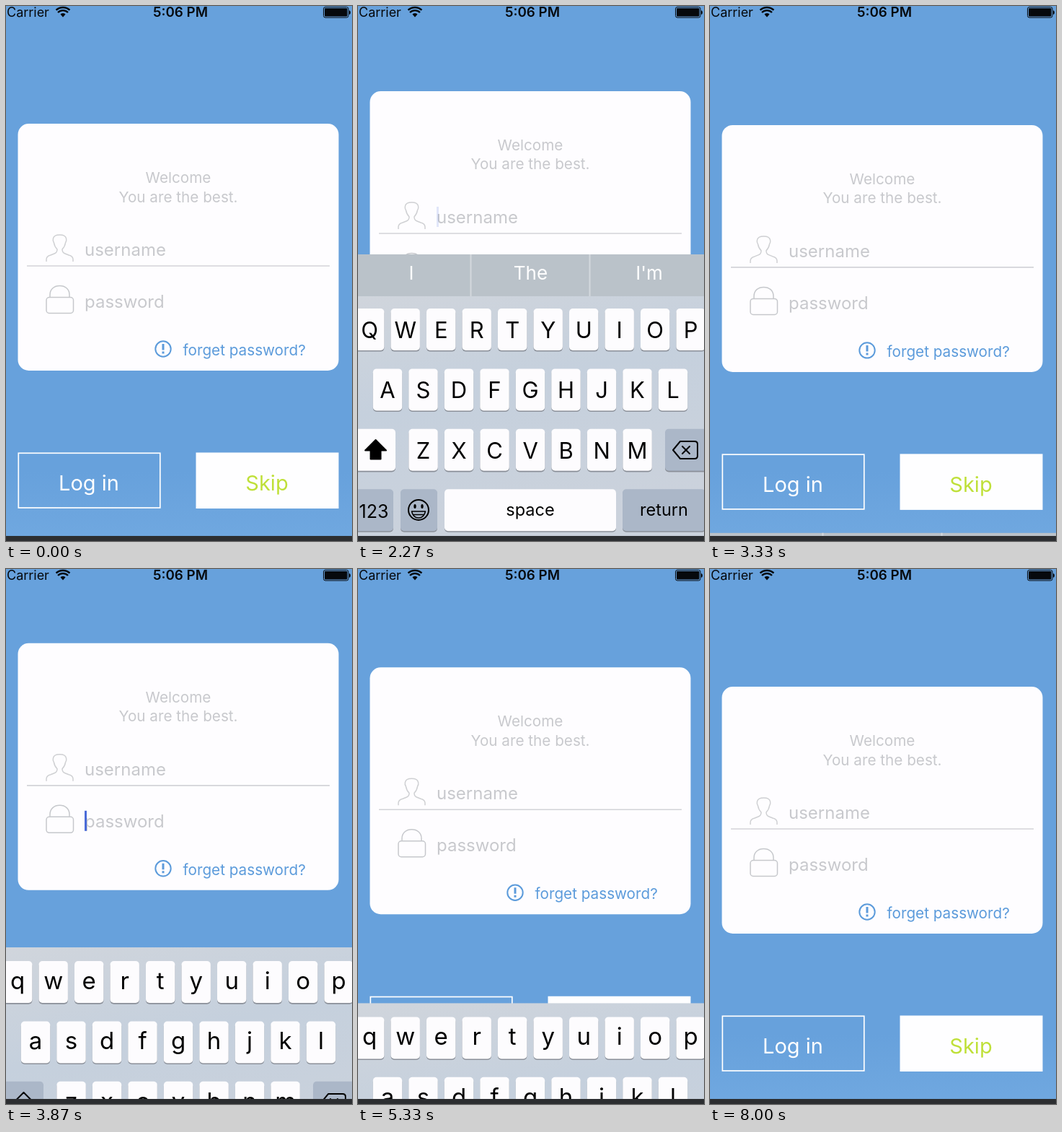
An HTML page for the animation above (8.14 s loop, 480x741 px).

```html
<!DOCTYPE html>
<html lang="en">
<head>
<meta charset="utf-8">
<title>Login screen</title>
<style>
  html, body { margin: 0; width: 100%; height: 100%; overflow: hidden; background: #67a1dc; }
  svg { display: block; width: 100%; height: 100%; font-family: Inter, Roboto, sans-serif; }
  .mid { text-anchor: middle; }
  .hint { fill: #c8c9cd; font-size: 24px; }
  .greeting { fill: #c8c9cd; font-size: 20.7px; text-anchor: middle; }
  .outline { fill: none; stroke: #cfd0d3; stroke-width: 1.5; }
  .lock { stroke: #c6c8cc; }
  .glyph { fill: none; stroke: #000; stroke-width: 2; stroke-linejoin: round; stroke-linecap: round; }
  .caret { fill: #4a6bd8; }
</style>
</head>
<body>
<svg viewBox="0 0 480 741" preserveAspectRatio="none">
  <defs>
    <linearGradient id="sky" x2="0" y2="1">
      <stop offset=".87" stop-color="#67a1dc"/>
      <stop offset="1" stop-color="#70a8e0"/>
    </linearGradient>
    <linearGradient id="board" x2=".3" y2="1">
      <stop offset="0" stop-color="#d0d5dc"/>
      <stop offset=".45" stop-color="#c5d0dd"/>
      <stop offset="1" stop-color="#cbd2dc"/>
    </linearGradient>
  </defs>
  <rect width="480" height="741" fill="url(#sky)"/>

  <g id="form">
    <rect x="16.5" y="163" width="445" height="342" rx="15" fill="#fefdff"/>
    <text class="greeting" x="239" y="245">Welcome</text>
    <text class="greeting" x="239" y="271.500">You are the best.</text>
    <path class="outline" d="M56 354v-3c0-3 2-5 6-6l5-2c3-1 4-3 4-6c-3-3-4-6-4.500-9c-2-3-1.500-4-1-6c.5-3 4-5 9-5s8.500 2 9 5c.5 2 1 3-1 6c-.5 3-1.500 6-4.500 9c0 3 1 5 4 6l5 2c4 1 6 3 6 6v3"/>
    <text class="hint" x="109" y="346">username</text>
    <path d="M29 360H449" stroke="#d3d4d8" stroke-width="1.7"/>
    <path class="outline lock" d="M61 403v-3c0-8 6-12.500 13.500-12.500s13.500 4.500 13.500 12.500v3"/>
    <rect class="outline lock" x="56" y="403.500" width="37.500" height="22" rx="4"/>
    <text class="hint" x="109" y="418">password</text>
    <g fill="none" stroke="#5c9bdb" stroke-width="2">
      <circle cx="218" cy="475" r="10.700"/>
      <path d="M218 468v8.500m0 2v3" stroke-width="3"/>
    </g>
    <text x="245.500" y="484" font-size="20.700" fill="#5c9bdb">forget password?</text>
    <rect x="17.300" y="619.300" width="196.500" height="75.700" fill="none" stroke="#fff" stroke-width="1.700"/>
    <text class="mid" x="115" y="671" font-size="29" fill="#fff">Log in</text>
    <rect x="263.500" y="618.500" width="198" height="77.500" fill="#fefeff"/>
    <text class="mid" x="362" y="671" font-size="29" fill="#bfe039">Skip</text>
    <rect class="caret" id="userCaret" x="109" y="323" width="3" height="28"/>
    <rect class="caret" id="passCaret" x="109" y="395" width="3" height="28"/>
  </g>

  <g fill="#06090d">
    <text x="1" y="15" font-size="18">Carrier</text>
    <text class="mid" x="242" y="15" font-size="18.800" font-weight="600">5:06 PM</text>
    <path d="M75.500 11.500a5 5 0 0 1 7 0l-3.500 4z"/>
    <path d="M72 9a10 10 0 0 1 14 0M69.500 5.700a14 14 0 0 1 19 0" fill="none" stroke="#06090d" stroke-width="2.300"/>
    <rect x="440.500" y="1.500" width="34.500" height="14.500" rx="2.500" fill="none" stroke="#06090d"/>
    <rect x="442" y="3" width="31.500" height="11.500" rx="1"/>
    <path d="M476 6q2 .5 2 3t-2 3z"/>
  </g>

  <g id="userBoard"></g>
  <g id="passBoard"></g>
  <rect y="734" width="480" height="7" fill="#2c2e31"/>
</svg>

<script>
const LOOP = 8140;
const byId = id => document.getElementById(id);

function key(x, y, width, label, size, dark, baseline = 40) {
  const box = (dy, fill) =>
    `<rect x="${x}" y="${y + dy}" width="${width}" height="58" rx="5" fill="${fill}"/>`;
  return box(1.6, '#8b9099') + box(0, dark ? '#abb7c8' : '#fdfcfe') +
    `<text class="mid" x="${x + width / 2}" y="${y + baseline}" font-size="${size}">${label}</text>`;
}

function letterRow(letters, center, y, caps) {
  return [...letters].map((c, i) =>
    key(center + i * 49.5 - 20.2, y, 40.4, caps ? c.toUpperCase() : c,
      caps ? 31 : 33, false, caps ? 41 : 39)).join('');
}

function keyboard(caps) {
  const suggestions = `<rect y="344" width="480" height="58" fill="#bac2c9"/>
    <path d="M156.500 344v58M321.500 344v58" stroke="#d3d8dd" stroke-width="2"/>
    <g class="mid" fill="#fff" font-size="26"><text x="74" y="379">I</text>
    <text x="239.500" y="379">The</text><text x="404" y="379">I'm</text></g>`;
  const emoji = `<circle class="glyph" cx="84" cy="698" r="14"/>
    <path class="glyph" d="M74.500 700h19q-2 9-9.500 9t-9.500-9zM77 704.500h14" style="stroke-width:1.5"/>
    <ellipse cx="79" cy="693" rx="1.700" ry="3"/><ellipse cx="89" cy="693" rx="1.700" ry="3"/>`;
  return `<rect y="400" width="480" height="341" fill="url(#board)"/>` +
    (caps ? suggestions : '') +
    letterRow('qwertyuiop', 16.2, 419, caps) +
    letterRow('asdfghjkl', 41, 502.4, caps) +
    letterRow('zxcvbnm', 90.6, 585.8, caps) +
    key(-10, 585.8, 62, '', 23, !caps) +
    key(426, 585.8, 70, '', 23, true) +
    (caps ? key(-10, 669.2, 59, '', 23, true) + key(59, 669.2, 51, '', 23, true) + emoji
          : key(-10, 669.2, 120, '', 23, true)) +
    `<text class="mid" x="${caps ? 22 : 53.5}" y="708.5" font-size="25">${caps ? '123' : '.?123'}</text>` +
    key(120, 669.2, 238, 'space', 23.5, false, 37) +
    key(367, 669.2, 115, 'return', 23.5, true, 37) +
    `<path class="glyph" style="fill:${caps ? '#000' : 'none'}" d="M24.500 601L39 615.500h-7.500v12h-14v-12h-7.500z"/>
    <path class="glyph" d="M447 603h20q4 0 4 4v16q0 4-4 4h-20l-10-12zM450 610l10 10m0-10l-10 10"/>`;
}

byId('userBoard').innerHTML = keyboard(true);
byId('passBoard').innerHTML = keyboard(false);

// Underdamped step for the form, critically damped step for the keyboards.
function bounce(ms) {
  if (ms <= 0) return 0;
  const x = 14 * ms / 1000, d = 0.7, w = Math.sqrt(1 - d * d);
  return 1 - Math.exp(-d * x) * (Math.cos(w * x) + d / w * Math.sin(w * x));
}

function glide(ms) {
  if (ms <= 0) return 0;
  const x = 18.26 * ms / 1000;
  return 1 - Math.exp(-x) * (1 + x);
}

const sessions = [
  { board: 'userBoard', caret: 'userCaret', focus: 1270, open: 1390, close: 2985, lift: 45, travel: 391 },
  { board: 'passBoard', caret: 'passCaret', focus: 3634, open: 3754, close: 5220, lift: 60, travel: 335 }
];

function caretOpacity(t, { focus, close }) {
  if (t < focus || t >= close) return 0;
  const age = t - focus, phase = age % 1000;
  if (age > 950 && phase < 130) return 0.15 + 0.85 * phase / 130;
  if (phase > 970) return 0.15 * (phase - 970) / 30;
  return Math.max(0, Math.min(1, (850 - phase) / 150));
}

function frame(now) {
  const t = now % LOOP;
  let lift = 0;
  for (const s of sessions) {
    lift += s.lift * (bounce(t - s.focus) - bounce(t - s.close));
    const shown = glide(t - s.open) - glide(t - s.close);
    byId(s.board).setAttribute('transform', `translate(0 ${s.travel * (1 - shown)})`);
    byId(s.board).style.display = shown > 0.002 ? '' : 'none';
    byId(s.caret).style.opacity = caretOpacity(t, s);
  }
  byId('form').setAttribute('transform', `translate(0 ${-lift})`);
  requestAnimationFrame(frame);
}
frame(performance.now());
</script>
</body>
</html>
```
